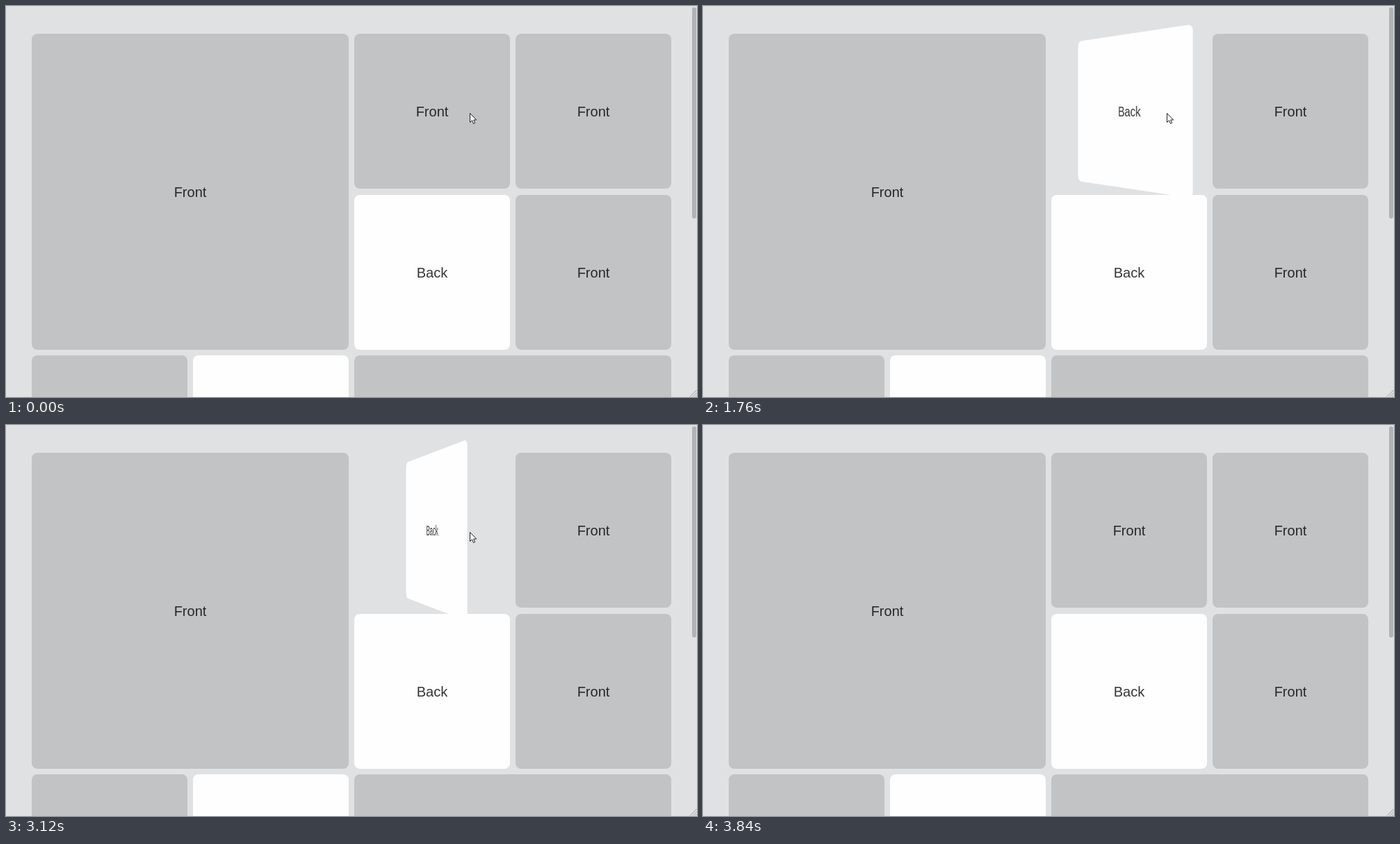
Animation, 994 px wide and 563 px high, one loop 4520 ms. Source, as an HTML page:

```html
<!DOCTYPE html>
<html lang="en">
<head>
<meta charset="utf-8">
<title>Flip cards</title>
<style>
  html, body { margin: 0; width: 100%; height: 100%; overflow: hidden; background: #e0e1e3; }
  body { position: relative; font: 20px "Liberation Sans", Arial, sans-serif; }
  .card, .face, svg, .bar { position: absolute; }
  .card { perspective: 700px; }
  .face {
    inset: 0; display: flex; align-items: center; justify-content: center;
    padding-top: 1px; box-sizing: border-box;
    border-radius: 8px; background: #c2c3c5; color: #272727;
  }
  .back { background: #fefefe; color: #363636; }
  .bar { left: 987px; top: 2px; width: 6px; height: 304px; border-radius: 3px; background: #b1b2b4; }
  svg { left: 0; top: 0; }
</style>
</head>
<body>
<div class="bar"></div>
<svg width="994" height="563" fill="none">
  <path d="M984 562.5l9.500-9.500M988 562.500l5.500-5.500M991.500 562.500l2-2" stroke="#999a9c"/>
  <g id="pointer">
    <circle id="press" cx="1" cy="1" r="8.500" fill="#fff" fill-opacity=".2" stroke="#333"/>
    <path d="M.5 .5v13l3-2.800 2 4.800 2.200-1-2-4.500h4z" fill="#fff" stroke="#222"/>
  </g>
</svg>
<script>
const LOOP = 4520, FLIP = 715;
const pointer = document.getElementById('pointer');
const press = document.getElementById('press');

function addCard(x, y, w, h, side) {
  const card = document.createElement('div');
  card.className = 'card';
  card.style.cssText = `left:${x}px;top:${y}px;width:${w}px;height:${h}px`;
  const face = document.createElement('div');
  card.append(face);
  document.body.insertBefore(card, document.querySelector('.bar'));
  show(face, side);
  return face;
}

function show(face, side) {
  face.className = side === 'Back' ? 'face back' : 'face';
  face.textContent = side;
}

addCard(37, 40, 456, 455, 'Front');
const flipper = addCard(501, 40, 224, 223, 'Front');
addCard(733, 40, 224, 223, 'Front');
addCard(501, 272, 224, 223, 'Back');
addCard(733, 272, 224, 223, 'Front');
addCard(37, 503, 224, 223, 'Front');
addCard(269, 503, 224, 223, 'Back');
addCard(501, 503, 456, 223, 'Front');

// cubic-bezier(.175, .885, .32, 1.275): turns past the end and settles back
function easeBack(x) {
  if (x <= 0) return 0;
  if (x >= 1) return 1;
  const bez = (s, a, b) => 3 * s * (1 - s) ** 2 * a + 3 * s * s * (1 - s) * b + s ** 3;
  let lo = 0, hi = 1;
  for (let i = 0; i < 24; i++) {
    const mid = (lo + hi) / 2;
    if (bez(mid, .175, .32) < x) lo = mid; else hi = mid;
  }
  return bez(lo, .885, 1.275);
}

// The picture is held between these moments
const ticks = [0, 1400, 1580, 1640, 1700, 1760, 1810, 1870, 1930, 1990,
  2040, 2100, 2160, 2220, 2270, 2330, 2910];
for (let t = 3060; t <= 3840; t += 60) ticks.push(t);

function draw(time) {
  const t = ticks.findLast(k => k <= time);
  const angle = 180 * (easeBack((t - 1613) / FLIP) - easeBack((t - 3062) / FLIP));
  const back = angle > 90;
  show(flipper, back ? 'Back' : 'Front');
  const turn = back ? angle - 180 : angle;
  flipper.style.transform = Math.abs(turn) < .1 ? 'none' : `rotateY(${turn}deg)`;

  const go = Math.max(0, (t - 3510) / 270) ** 1.5;
  pointer.setAttribute('transform', `translate(${667 + 135 * go} ${154 + 313 * go})`);
  pointer.style.display = t >= 3840 ? 'none' : '';
  press.style.display = (t >= 1400 && t < 1580) || (t >= 2910 && t < 3060) ? '' : 'none';
}

const start = performance.now();
function frame() {
  draw((performance.now() - start) % LOOP);
  requestAnimationFrame(frame);
}
frame();
</script>
</body>
</html>
```
